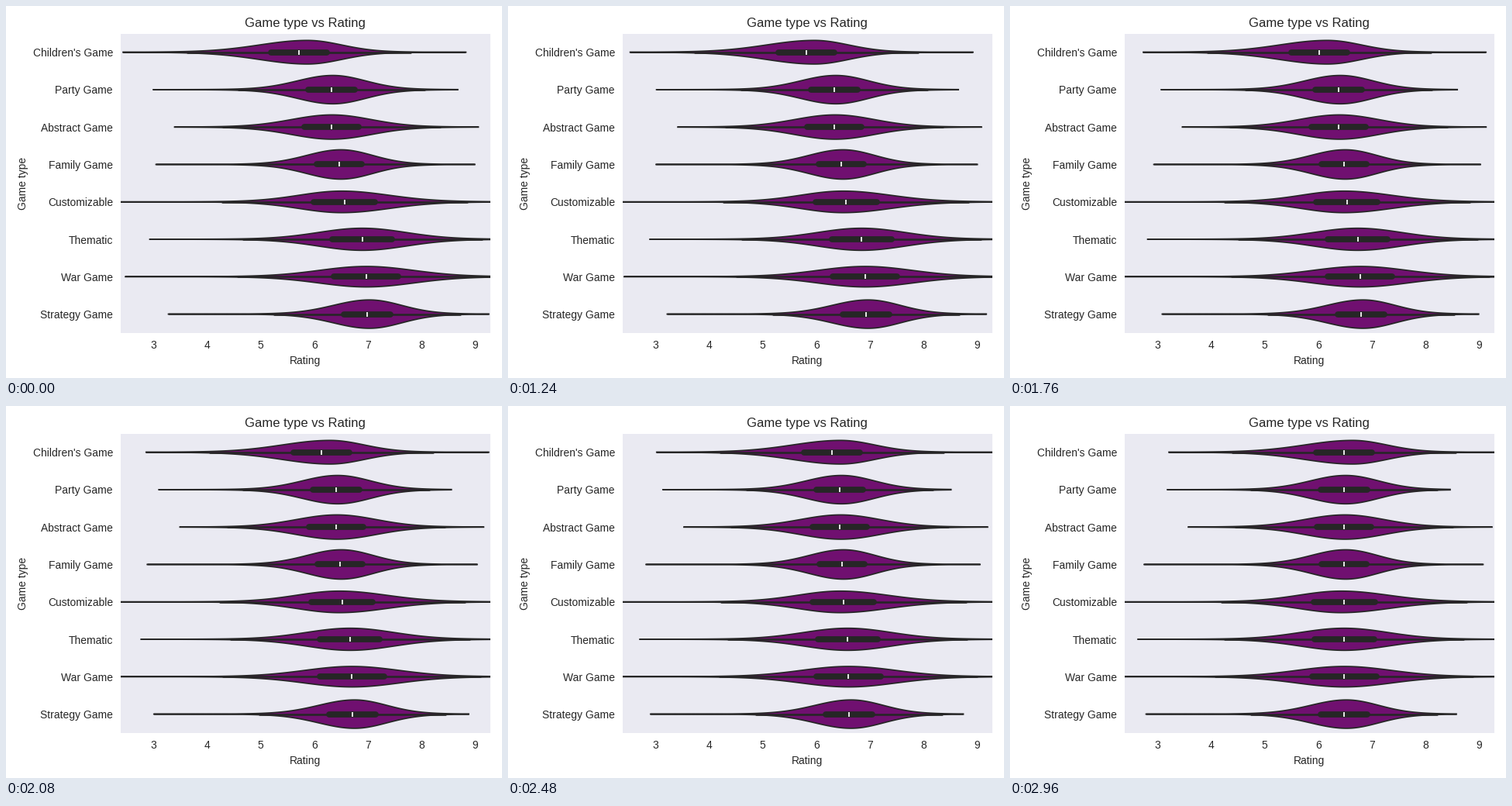
A matplotlib script that plays this animation: 640 px wide and 480 px high, repeating every 5 s.

```python
import numpy as np
import matplotlib.pyplot as plt
from matplotlib.animation import FuncAnimation

W, H, DPI = 640, 480, 100
LEFT, RIGHT, TOP, BOTTOM = 147.6, 625, 35.5, 421.7
FRAMES, INTERVAL = 125, 40
HOLD, STEPS = 25, 49      # frames at rest, then steps of the move
MEET = 431.2              # where every median settles
DARK, PURPLE = "#262626", "#701070"
LW = 1.25

plt.rcParams.update({
    "font.family": "Liberation Sans",
    "text.color": DARK, "axes.labelcolor": DARK,
    "xtick.color": DARK, "ytick.color": DARK,
    "axes.facecolor": "#EAEAF2",
    "lines.solid_capstyle": "round",
})

# name, median, half box, lean of the peak, low end and high end (from, to);
# all in stage pixels
ROWS = [
    ("Children's Game", 378, 36, 11, (151, 205), (593.5, 647)),
    ("Party Game", 419.7, 30, 2, (190, 203), (583, 568)),
    ("Abstract Game", 419.7, 35, 1, (217.5, 230), (609.5, 622)),
    ("Family Game", 430.2, 29, 2, (193.5, 173), (605, 610.5)),
    ("Customizable", 437, 39.5, -4, (125, 115), (680, 672)),
    ("Thematic", 459.7, 38.5, 0, (185.5, 165), (668, 640)),
    ("War Game", 465, 41.5, 0, (154, 120), (680, 646)),
    ("Strategy Game", 466, 30, 3, (209.5, 175.5), (623, 576)),
]


def mix(a, b, t):
    return a + (b - a) * t


def bell(z):
    """Normal curve with slightly heavy tails."""
    return 0.93 * np.exp(-z ** 2 / 2) + 0.07 * np.exp(-z ** 2 / 7)


def profile(x, median, half, lean):
    """Half height of a violin: equal areas, spread taken from the box."""
    sd = half * 1.45
    d = x - median - lean
    side = np.where(d < 0, sd + 0.8 * lean, sd - 0.8 * lean)
    return 550 / half * bell(d / side)


class Violin:
    def __init__(self, ax, y, median, half, lean, low, high):
        self.y, self.median, self.half, self.lean = y, median, half, lean
        self.low, self.high = low, high
        self.body, = ax.fill([], [], fc=PURPLE, ec=DARK, lw=LW, zorder=1.5)
        self.whisker, = ax.plot([], [], color=DARK, lw=LW * 1.5)
        self.box, = ax.plot([], [], color=DARK, lw=LW * 4.5)
        self.mark, = ax.plot([], [], "|", color="white",
                             ms=LW * 3.75, mew=LW)

    def update(self, t):
        y, half = self.y, self.half
        mid = mix(self.median, MEET, t)
        x = np.linspace(mix(*self.low, t), mix(*self.high, t), 160)
        h = profile(x, mid, half, self.lean)
        self.body.set_xy(np.column_stack([np.r_[x, x[::-1]],
                                          np.r_[y - h, (y + h)[::-1]]]))
        # whiskers reach 1.5 box lengths past the box
        self.whisker.set_data([mid - 4 * half, mid + 4 * half], [y, y])
        self.box.set_data([mid - half, mid + half], [y, y])
        self.mark.set_data([mid], [y])
        return self.body, self.whisker, self.box, self.mark


fig = plt.figure(figsize=(W / DPI, H / DPI), dpi=DPI, facecolor="white")
ax = fig.add_axes([LEFT / W, 1 - BOTTOM / H,
                   (RIGHT - LEFT) / W, (BOTTOM - TOP) / H])
ax.set(xlim=(LEFT, RIGHT), ylim=(BOTTOM, TOP), title="Game type vs Rating",
       xlabel="Rating", ylabel="Game type")
ax.spines[:].set_visible(False)
ax.tick_params(left=False, bottom=False)

pitch = (BOTTOM - TOP) / len(ROWS)
centres = TOP + pitch * (np.arange(len(ROWS)) + 0.5)
ax.set_xticks(190.4 + 69.17 * np.arange(7), [str(n) for n in range(3, 10)])
ax.set_yticks(centres, [row[0] for row in ROWS])
violins = [Violin(ax, y, *row[1:]) for y, row in zip(centres, ROWS)]


def draw(frame):
    t = np.clip((frame - HOLD) / STEPS, 0, 1)
    return [artist for v in violins for artist in v.update(t)]


anim = FuncAnimation(fig, draw, frames=FRAMES, init_func=lambda: draw(0),
                     interval=INTERVAL, repeat=True, repeat_delay=0)
plt.show()
```
